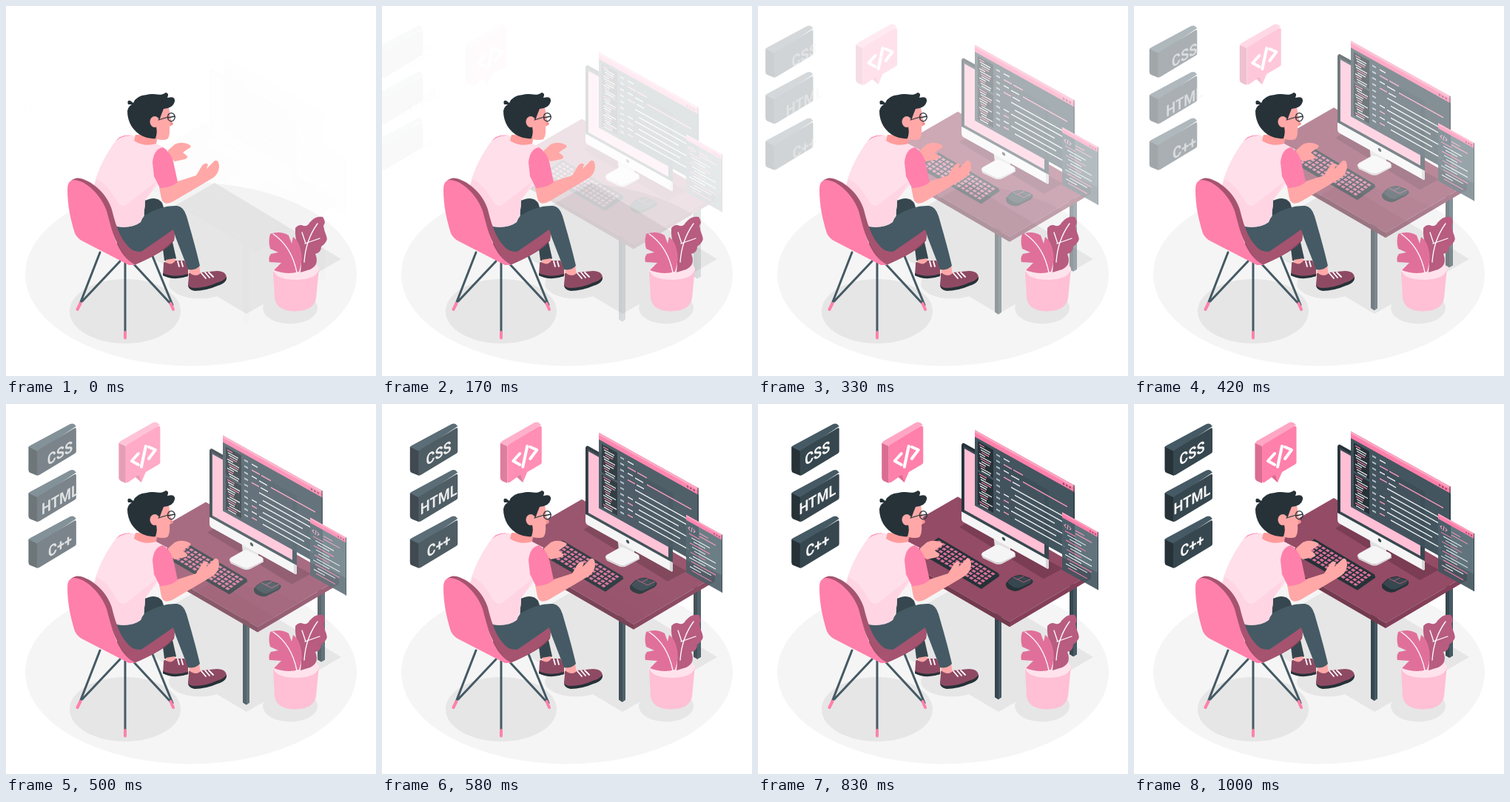
An HTML page for the animation above (1040 ms loop, 500 by 500 pixels).

```html
<!DOCTYPE html>
<html lang="en">
<head>
<meta charset="utf-8">
<title>Developer at a desk</title>
<style>
  html, body { margin: 0; width: 100%; height: 100%; overflow: hidden; background: #fff; }
  svg { display: block; width: 100vw; height: 100vh; }
  text { font: 700 21px Roboto, "Liberation Sans", sans-serif; text-anchor: middle; fill: #f5f5f5; }
  .line { fill: none; stroke-linecap: round; stroke-linejoin: round; }
</style>
</head>
<body>
<svg viewBox="0 0 500 500">
  <ellipse cx="250" cy="362.500" rx="224" ry="124" fill="#f5f5f5"/>
  <g fill="#e6e6e6">
    <path d="M282 239L453 342L325 416L160 318L160 309Z"/>
    <ellipse cx="161" cy="412.500" rx="75" ry="43.500"/>
    <ellipse cx="384" cy="408" rx="37" ry="21.500"/>
    <ellipse cx="262" cy="375" rx="42" ry="20.500"/>
  </g>

  <g id="desk">
    <path d="M421 245H431V340L426 343L421 340Z" fill="#37474f"/>
    <path d="M426 245H431V340L426 343Z" fill="#455a64"/>
    <path d="M320 280H329V398L324.500 401L320 398Z" fill="#37474f"/>
    <path d="M325 290H329V398L325 401Z" fill="#455a64"/>
    <path d="M270 127L450 231L340 296L159 191Z" fill="#944b65"/>
    <path d="M159 191L340 296V303L159 198Z" fill="#733a4e"/>
    <path d="M450 231L340 296V303L450 238Z" fill="#843f59"/>
    <path d="M272 168L290 158L412 224L386 238Z" fill="#7a3d53"/>

    <path d="M318 178L341 190V203Q331 210 321 204Z" fill="#e0e0e0"/>
    <path d="M304 202L320 193Q324 191 328 193L345 201Q350 204 346 208L331 215Q325 218 319 215L304 208Q300 205 304 202Z" fill="#f5f5f5"/>
    <path d="M302 205Q301 207 304 208L319 215Q325 218 331 215L346 208Q348 206 348 205V208L331 217Q325 220 319 217L304 210Q302 208 302 205Z" fill="#dadada"/>
    <g transform="matrix(1 .556 0 1 275 56)">
      <path d="M0 2Q0 -1 3 -3H118V92H0Z" fill="#263238"/>
      <path d="M3 1H118V92H3Z" fill="#37474f"/>
      <rect x="4" y="4" width="108" height="83" fill="#ffbfd5"/>
      <path d="M0 91H118V101Q118 104 115 104H3Q0 104 0 100Z" fill="#f5f5f5"/>
      <path d="M114 91H118V101Q118 104 114 104Z" fill="#d5d5d5"/>
      <circle cx="57" cy="96.500" r="2.200" fill="#37474f"/>
    </g>

    <g id="keyboard" transform="matrix(5.300 3.150 -4.800 3.400 244 183)">
      <path d="M-.1 -.1H15.200L15.900 .4V5.500L.5 5.700L-.1 5Z" fill="#263238"/>
    </g>
    <path d="M335 244Q344 232 356 233L368 237Q375 241 368 246L356 252Q349 257 341 253Q334 250 335 244Z" fill="#263238"/>
    <path d="M337 243Q345 233 356 234L368 238Q372 241 367 244L354 250Q346 252 337 243Z" fill="#37474f"/>
    <path d="M345 236L359 243L369 238M351 239L359 235" class="line" stroke="#b35978"/>

    <g id="editor" transform="matrix(1 .556 0 1 293 37)">
      <rect width="135" height="102" fill="#3d505a" opacity=".97"/>
      <path d="M0 0H135V9H0Z" fill="#ff80ab"/>
      <path d="M0 0H135V3H0Z" fill="#ffa6c4"/>
      <path d="M4 13H25V51H4ZM4 54H25V98H4Z" fill="#263238"/>
      <path d="M134 0V102" stroke="#263238"/>
    </g>
    <g id="panel" transform="matrix(1 .556 0 1 411 148)">
      <rect width="49" height="78" fill="#4c616c" opacity=".88"/>
      <path d="M0 0H49V7H0Z" fill="#ff80ab"/>
      <path d="M0 0H49V2H0Z" fill="#ffa6c4"/>
      <path d="M0 55H49V78H0Z" fill="#263238" opacity=".25"/>
      <path d="M5 14L3 16L5 18M8 13L7 19M10 14L12 16L10 18" class="line" stroke="#ffa6c4"/>
      <path d="M48.500 0V78" stroke="#37474f"/>
    </g>
  </g>

  <g id="tags">
    <g id="bubble">
      <path d="M163.500 54Q163.500 52 166 50L209 25.500Q212 24 215 25L219 28L173 57Z" fill="#ffa6c4"/>
      <path d="M163.500 53L173 57V107L166 104Q163.500 102 163.500 100Z" fill="#d96d92"/>
      <path d="M173 59Q173 56 175 55L216 30Q219.500 29 219.500 32V79Q219.500 81 217 82L200 92L194 106L186 99L176 106Q173 107 173 104Z" fill="#ff80ab"/>
      <path d="M186 98L191 96L194 106Z" fill="#d96d92"/>
      <path d="M190 67L181 77L190 82M200 57L194 85M204 58L213 62L204 74" class="line" stroke="#fff" stroke-width="4"/>
    </g>
  </g>
  <g id="labels"></g>

  <!-- seat and person -->
  <g id="chairLegs" class="line" stroke="#455a64" stroke-width="3">
    <path d="M127 333L99 405M154 345L103 399M161 347V443M171 347L223 403M198 338L225 404"/>
    <path d="M100.500 402L96.500 410M161 441V448.500M222.500 402L226 410" stroke="#ff80ab" stroke-width="4"/>
  </g>
  <path d="M211 320L223 310L230 341Q223 346 214 344Z" fill="#37474f"/>
  <path d="M216 343L228 341L231 350L219 355Z" fill="#ffa8a7"/>
  <path d="M213 349Q213 344 217 347Q224 351 229 344L241 344L246 353V365Q226 371 212 364Z" fill="#8f4a63"/>
  <path d="M212 361Q227 368 246 362V365Q227 372 212 364Z" fill="#263238"/>
  <path d="M232 345L234 352M237 345L239 352" class="line" stroke="#fff" stroke-width="1.800"/>
  <path d="M150 300L180 334L226 301Q229 309 227 317Q216 332 173 350L150 334Z" fill="#8c465e"/>
  <path d="M180 334L226 301Q229 307 227 310Q205 331 170 340Z" fill="#a65370"/>
  <path d="M186 264Q203 255 211 266L214 275L187 288Z" fill="#37474f"/>
  <path d="M247 354L261 350L263 364L249 368Z" fill="#ffa8a7"/>
  <path d="M247 366Q246 358 250 362Q258 367 264 360L285 358Q298 358 298 368Q296 374 285 377Q270 384 255 384Q246 383 246 376Z" fill="#8f4a63"/>
  <path d="M246 376Q247 381 255 381Q270 381 285 374Q295 371 298 366Q299 374 286 378Q270 385 255 385Q246 384 246 376Z" fill="#263238"/>
  <path d="M264 361L270 368M269 360L275 367M274 360L280 366" class="line" stroke="#fff" stroke-width="1.800"/>
  <path d="M148 296C160 302 180 296 187 283Q210 269 231 270Q240 271 244 284C250 305 256 325 262 351Q256 358 246 356L229 312L226 302L180 334Q168 336 160 322Z" fill="#455a64"/>

  <path d="M219 195L228 187Q238 182 249 188Q251 191 246 193L239 198L244 202Q247 205 242 207L228 210Q223 207 219 200Z" fill="#ffa8a7"/>
  <path d="M147 185Q153 172 172 175L160 184Z" fill="#ff80ab"/>
  <path d="M172 175Q190 184 203 186L218 194L210 236Q201 246 188 262Q188 280 182 292Q170 301 150 298L118 246Q124 217 144 188Q153 174 172 175Z" fill="#ffdfea"/>
  <path d="M118 246L122 234Q136 239 151 266Q158 274 166 266L204 236Q196 252 188 262Q188 280 182 292Q170 301 150 298Z" fill="#ffd5e3"/>
  <path d="M175 174L205 175L203 186Q187 191 173 182Z" fill="#ff9b9b"/>
  <path d="M205 141L220 137Q222 146 222 151L226 160L221 163Q222 176 218 180Q212 182 204 180L199 164Z" fill="#ffa8a7"/>
  <path d="M222 153L226 160L222 161Z" fill="#f28f8f"/>
  <path d="M165 133Q163 127 168 128L172 131Q176 121 190 120C200 117 208 123 216 117Q221 118 218 124Q229 121 228 129Q226 138 213 139Q210 146 208 152L203 164Q205 170 202 179Q193 180 185 176C172 170 164 157 164 142Q165 136 170 133Z" fill="#263238"/>
  <ellipse cx="201" cy="156.500" rx="6.500" ry="7.500" fill="#ffa8a7"/>
  <path d="M206 154L219 150M220 146A5 5.500 0 1 1 219 153Q218 148 220 146M219 151L228 149" class="line" stroke="#263238" stroke-width="1.300"/>
  <path d="M207 245L232 237L257 229L263 219Q268 210 273 214L271 220L282 209Q288 207 288 218Q287 227 280 232L260 244L226 264Q213 271 210 260Z" fill="#ffa8a7"/>
  <path d="M198 211Q200 193 212 191Q222 197 226 210L232 238Q222 246 208 246L200 230Z" fill="#ff80ab"/>

  <path d="M88 236Q94 231 101 233C119 238 137 255 143 275C149 300 156 319 171 330Q182 334 190 330L227 308L227 315Q210 335 173 350C151 333 143 302 130 272Q112 240 88 236Z" fill="#a65370"/>
  <path d="M83 248Q83 236 91 235C108 235 129 256 136 277C144 305 150 337 175 350H166L104 318Q96 314 93 307C87 288 83 268 83 248Z" fill="#ff80ab"/>

  <!-- plant -->
  <path d="M361 359L363 395Q366 412.500 391 412.500Q416 412 419 395L423 354Z" fill="#ffbfd5"/>
  <path d="M361 357Q364 348 392 346Q422 346 423 355Q421 369 393 370Q365 370 361 357Z" fill="#ffe3ec"/>
  <path d="M428 285Q433 292 429 297Q430 304 433 311Q436 318 426 325Q426 333 418 335Q424 350 411 356L398 360Q401 335 396 325Q390 316 391 300Q396 294 402 297Q408 298 410 293Q418 283 428 285Z" fill="#b85c80"/>
  <path d="M357 308Q371 303 382 310L386 321L388 312Q397 319 398 330Q402 341 396 359Q380 364 362 357L372 347L356 346Q354 340 358 335L368 333L357 328Q354 318 357 308Z" fill="#e0709a"/>
  <path d="M361 308Q386 325 393 360M421 294Q405 316 403 346M405 321L400 306M404 321L424 314" class="line" stroke="#fff" stroke-width="1.300"/>
</svg>
<script>
const LOOP = 1040, FPS = 24, SLIDE = 30;
const $ = id => document.getElementById(id);
const add = (id, markup) => $(id).insertAdjacentHTML("beforeend", markup);

// Segments are [x, y, length]; drawn along the slope of their window.
const strokes = (segments, color, width) =>
  `<path d="${segments.map(([x, y, n]) => `M${x} ${y}h${n}`).join("")}" stroke="${color}" stroke-width="${width}"/>`;
const range = (n, fn) => Array.from({ length: n }, (_, i) => fn(i));

function drawEditor() {
  const mini = range(26, i => [6 + i * 5 % 4, 16 + i * 3.1 + (i > 11 ? 3 : 0), 7 + i * 7 % 9]);
  add("editor", strokes(mini.filter((_, i) => i % 3), "#f5f5f5", 1.3) +
    strokes(mini.filter((_, i) => i % 3 === 0), "#ff80ab", 1.3) +
    strokes(range(10, i => [29, 17 + i * 8.2, 5]), "#b0bec5", 2.2) +
    strokes([[39, 25, 11], [52, 25, 13], [65, 34, 60], [39, 42, 10], [39, 73, 7], [39, 89, 7]], "#ff9bbd", 1.5) +
    strokes([[39, 17, 8], [39, 33, 7], [49, 34, 11], [51, 42, 10], [39, 65, 7], [39, 81, 7],
      ...range(6, i => [49 + i % 2 * 5, 50 + i * 8, 69 - i * 5 % 12])], "#f5f5f5", 1.5) +
    range(3, i => `<circle cx="${120 + i * 4.3}" cy="6" r="1.300" fill="#8c465e"/>`).join(""));
}

function drawPanel() {
  const rows = range(13, i => [4 + i * 3 % 8, 23 + i * 4, 14 + i * 11 % 20]);
  add("panel", strokes(rows.filter((_, i) => i % 3), "#f5f5f5", 1.1) +
    strokes(rows.filter((_, i) => i % 3 === 0), "#ff80ab", 1.1) +
    strokes([[18, 15, 12], [18, 19, 22]], "#ff9bbd", 1.1) +
    range(3, i => `<circle cx="${38 + i * 3.5}" cy="4.500" r="1" fill="#8c465e"/>`).join(""));
}

function drawKeys() {
  add("keyboard", range(70, i =>
    `<rect x="${.5 + i % 14 * 1.05}" y="${.45 + Math.floor(i / 14) * .93}" width=".72" height=".6" fill="#d9709a"/>`).join(""));
}

function drawTags() {
  ["CSS", "HTML", "C++"].forEach((word, i) => {
    const y = i * 62.5;
    add("tags", `<g transform="translate(0 ${y})">
      <path d="M41.500 59Q41.500 57 44 56L98 27Q101 26 103 27L106 30L54 65Z" fill="#455a64"/>
      <path d="M41.500 58L54 64V97L44 93Q41.500 92 41.500 89Z" fill="#263238"/>
      <path d="M53 66Q53 63 55 62L103 33Q106 31 106 34V64Q106 66 104 67L56 96Q53 97 53 95Z" fill="#37474f"/></g>`);
    add("labels", `<text transform="matrix(.87 -.5 0 1 78.500 ${73.5 + y})">${word}</text>`);
  });
}

// Solves cubic-bezier(.36, -.01, .5, 1.38) at the given time.
function ease(time) {
  const curve = (s, a, b) => 3 * (1 - s) ** 2 * s * a + 3 * (1 - s) * s * s * b + s ** 3;
  let low = 0, high = 1;
  for (let i = 0; i < 24; i++) {
    const mid = (low + high) / 2;
    if (curve(mid, .36, .5) < time) low = mid; else high = mid;
  }
  return curve(low, -.01, 1.38);
}

function place(id, x, y, opacity) {
  $(id).setAttribute("transform", `translate(${x} ${y})`);
  $(id).setAttribute("opacity", Math.min(1, Math.max(0, opacity)));
}

function render(ms) {
  const step = Math.min(24, Math.floor((ms + 5) * FPS / 1000));
  const progress = ease(Math.min(1, (step + 1) / FPS - .003));
  const shown = Math.min(1, Math.max(0, progress));
  const offset = SLIDE * (1 - progress);
  place("desk", 0, offset, shown);
  place("tags", -2 * offset, 0, shown * shown);
  place("labels", -offset, 0, shown);
}

drawEditor();
drawPanel();
drawKeys();
drawTags();
const start = performance.now();
function tick() {
  render((performance.now() - start) % LOOP);
  requestAnimationFrame(tick);
}
tick();
</script>
</body>
</html>
```
